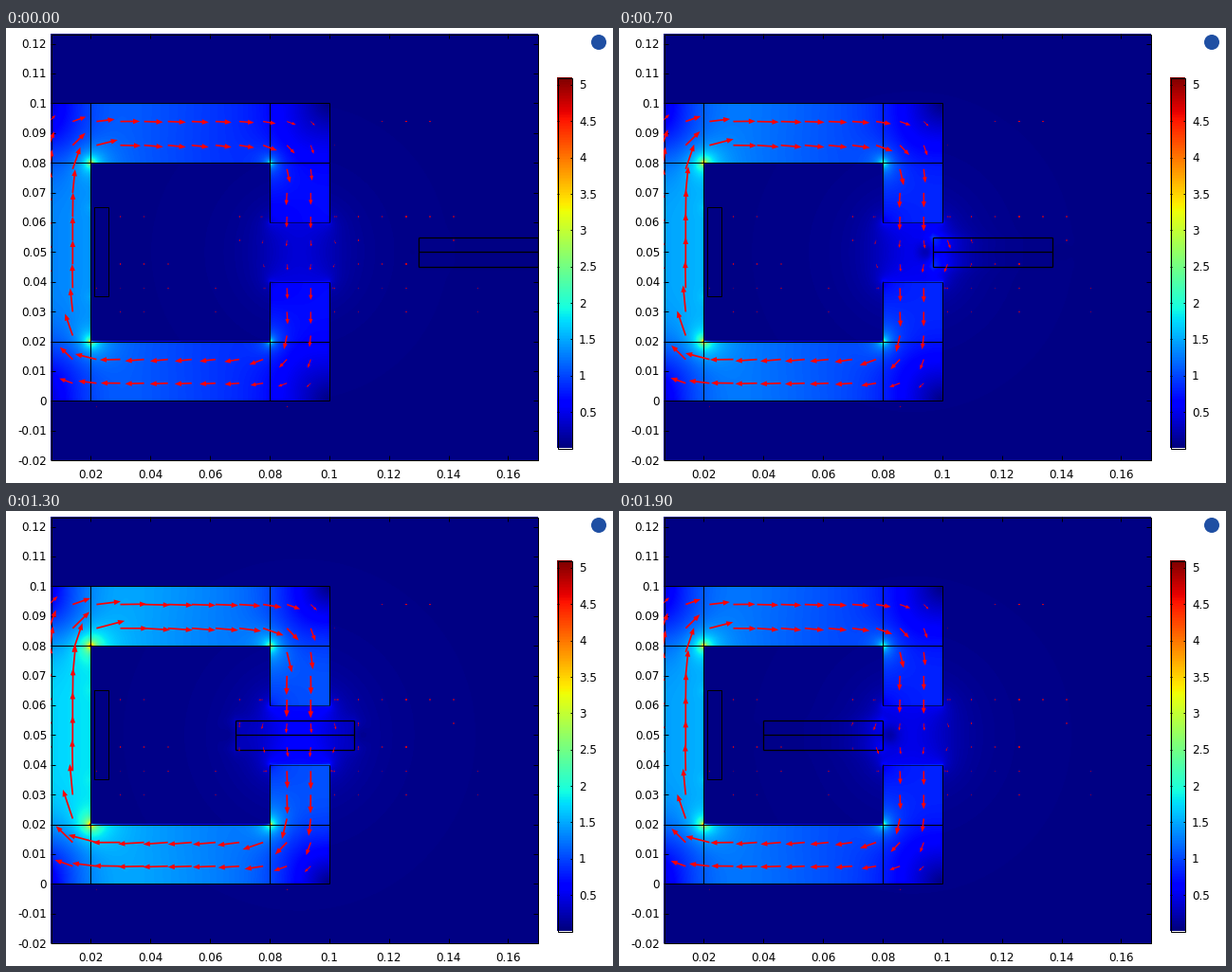
Recreate the animation shown at these times as a matplotlib script. Size 640x480 px, loop 2000 ms.

```python
import numpy as np
import matplotlib.pyplot as plt
from matplotlib.animation import FuncAnimation
from matplotlib.collections import LineCollection
from matplotlib.patches import Circle, Rectangle

W, H, DPI = 640, 480, 80
PT = 72 / DPI               # points per pixel
FRAMES, STEP = 20, 100
LEFT, TOP, PW, PH = 47, 6, 514, 450
VMAX = 5.1
ARROW = 18.8                # arrow pixels per tesla


def px(v):
    return 26.6 + 3143 * v


def py(v):
    return 393.3 - 3140 * v


# ---- flux in the upper half of the core, from a relaxed stream function ----
def solve_core(steps=2500):
    r, c = np.mgrid[0:127, 0:315].astype(float)
    width = np.minimum.reduce([c, r, 314 - c, np.full_like(c, 62)])
    depth = np.maximum(r, 63) - 63
    path = 94 + np.clip(c - 62, 0, 189) + np.where(c < 157, -depth, depth)
    leak = np.clip((path - 47) / 299, 0, 1)
    psi = np.stack([width, width * leak])
    iron = (r <= 63) | (c <= 62) | (c >= 251)
    free = (r < 63) | (c < 62) | (c > 251)
    free = free[1:-1, 1:-1]
    for _ in range(steps):
        mean = (psi[:, :-2, 1:-1] + psi[:, 2:, 1:-1]
                + psi[:, 1:-1, :-2] + psi[:, 1:-1, 2:]) / 4
        psi[:, 1:-1, 1:-1] = np.where(free, mean, psi[:, 1:-1, 1:-1])
        psi[:, -1] = psi[:, -2]
    d_row, d_col = np.gradient(psi, axis=(1, 2))
    return d_row[:, :, 20:], -d_col[:, :, 20:], iron[:, 20:]


def build_core():
    hx, hy, half = solve_core()
    bx, by = np.zeros((2, 2, PH, PW))
    mask = np.zeros((PH, PW), bool)
    up, down = slice(73, 200), slice(261, 388)
    bx[:, up, :295], by[:, up, :295], mask[up, :295] = hx, hy, half
    bx[:, down, :295] = -hx[:, ::-1]
    by[:, down, :295] = hy[:, ::-1]
    mask[down, :295] = half[::-1]
    by[:, 200:261, :43] = hy[:, -1:, :43]
    mask[200:261, :43] = True
    return bx, by, mask


def face(x, y, y0, a=278.0, b=341.0):
    """Field of a charged pole face from a to b at height y0."""
    dy = y - y0
    ex = 0.5 * np.log(((x - a) ** 2 + dy ** 2) / ((x - b) ** 2 + dy ** 2))
    ey = np.arctan((b - x) / dy) - np.arctan((a - x) / dy)
    return ex, ey


Y, X = np.mgrid[TOP:TOP + PH, LEFT:LEFT + PW] + 0.5
core_x, core_y, iron = build_core()
top_x, top_y = face(X, Y, 205.2)
bot_x, bot_y = face(X, Y, 267.2)
fade = np.exp(-np.hypot(X - 309, Y - 236) / 250) / 3.18
air_x, air_y = (top_x - bot_x) * fade, (top_y - bot_y) * fade
MID = py(0.05)


def bar_left(k):
    return 0.13 - 0.09 * k / (FRAMES - 1)


def field(k):
    e = np.interp(k, [0, 2, 5, 7, 9, 11, 15, 17, 19],
                  [0, 0.02, 0.18, 0.4, 0.75, 1, 1, 0.75, 0.35])
    limb, loss = 1.33 + 0.40 * e, 0.70 + 0.03 * e
    gap = 0.58 * (limb - loss)
    bx, by = air_x * gap, air_y * gap
    x0 = px(bar_left(k))
    x1 = px(bar_left(k) + 0.04)
    off_y = np.maximum(np.abs(Y - MID) - 15.7, 0)
    side = np.clip((MID - Y) / 8, -1, 1)
    for end, sign, gain in ((x0, 1, 0.6), (x1, -1, 0.36)):
        amp = gain * np.exp(-((end - 309.5) / 60) ** 2)
        inward = (X - end) * sign
        reach = np.maximum(inward, 0) / 20 + np.maximum(-inward, 0) / 6
        tip = amp * np.exp(-reach - off_y / 6)
        bx = bx + 0.37 * sign * side * tip
        by = by + 0.93 * tip
        spot = (X - end + 7 * sign) ** 2 + (Y - MID) ** 2
        dim = 1 - 0.6 * np.exp(-spot / 90)
        bx, by = bx * dim, by * dim
    bx = np.where(iron, limb * core_x[0] - loss * core_x[1], bx)
    by = np.where(iron, limb * core_y[0] - loss * core_y[1], by)
    return bx, by


# ---- stage ----
fig = plt.figure(figsize=(W / DPI, H / DPI), dpi=DPI, facecolor="white")
ax = fig.add_axes([0, 0, 1, 1])
ax.axis("off")


def segments(lines, width, **kw):
    art = LineCollection(lines, colors="black", linewidths=width * PT, **kw)
    ax.add_collection(art, autolim=False)
    return art


def box(x, y, w, h, **kw):
    return ax.add_patch(Rectangle((x, y), w, h, fill=False, ec="black",
                                  lw=PT, **kw))


def label(x, y, value, ha):
    ax.text(x, y + 4.5, f"{value:g}", ha=ha, va="baseline",
            family="DejaVu Sans", size=12 * PT, color="black")


image = ax.imshow(np.zeros((PH, PW)), cmap="jet", vmin=0, vmax=VMAX,
                  extent=(LEFT, LEFT + PW, TOP + PH, TOP),
                  interpolation="nearest", aspect="auto")
ax.imshow(np.linspace(VMAX, 0, 391)[:, None], cmap="jet", vmin=0, vmax=VMAX,
          extent=(581, 597, 443.5, 52.5), interpolation="nearest",
          aspect="auto")
ax.set_xlim(0, W)
ax.set_ylim(H, 0)
clip = Rectangle((LEFT, TOP), PW, PH, transform=ax.transData)

# core, coil and frame outlines
xa, xb, xc = px(0.02), px(0.08), px(0.1)
ya, yb, yc, yd, ye, yf = (py(v) for v in (0.1, 0.08, 0.06, 0.04, 0.02, 0))
outline = [[(LEFT, y), (xc, y)] for y in (ya, yb, ye, yf)]
outline += [[(x, s), (x, t)] for x in (xb, xc) for s, t in ((ya, yc), (yd, yf))]
outline += [[(xa, ya), (xa, yf)]]
segments(outline, 1)
segments([[(xb, y), (xc, y)] for y in (yc, yd)], 0.6)
box(px(0.021), py(0.065), px(0.026) - px(0.021), py(0.035) - py(0.065))
box(LEFT + 0.5, TOP + 0.5, PW - 1, PH - 1)
box(581.5, 52.5, 15, 391)

# ticks and labels
ticks = []
for i in range(1, 9):
    x = px(0.02 * i)
    ticks += [[(x, TOP), (x, TOP + 5)], [(x, TOP + PH - 5), (x, TOP + PH)]]
    label(x, 470.5, 0.02 * i, "center")
for i in range(-2, 13):
    y = py(0.01 * i)
    ticks += [[(LEFT, y), (LEFT + 5, y)],
              [(LEFT + PW - 5, y), (LEFT + PW, y)]]
    label(43, y, 0.01 * i, "right")
for i in range(1, 11):
    y = 443.5 - 76.7 * 0.5 * i
    ticks += [[(581, y), (583, y)], [(595, y), (597, y)]]
    label(604, y, 0.5 * i, "left")
segments(ticks, 1)

ax.add_patch(Circle((625, 15), 8, color="#1f4fa3", lw=0))

# moving bar
bar = segments([], 1.3, zorder=3)
bar.set_clip_path(clip)

# weak field marks: row -> columns of the arrow grid
GRID = 25.1
weak = {0: (13, 14, 15), 1: (11,), 4: (2, 3, 7, 11, 12, 13, 14, 15, 16),
        5: (7, 12, 16), 6: (2, 3, 4, 12, 13, 14),
        7: (1, 2, 3, 4, 6, 11, 12, 13, 14, 17),
        8: (2, 3, 6, 11, 12, 14, 17), 12: (1, 9)}
dots = np.array([(70.5 + GRID * i, 98.5 + GRID * j)
                 for j, cols in weak.items() for i in cols])
rng = np.random.default_rng(4)
tint = np.zeros((len(dots), 4))
tint[:, 0] = 1
tint[:, 3] = rng.uniform(0.25, 0.8, len(dots))
tint[1, 3] = 1
ax.scatter(dots[:, 0], dots[:, 1], s=(1.3 * PT) ** 2, c=tint, marker="s",
           linewidths=0, zorder=4)

# arrow grid
gx, gy = np.meshgrid(70.3 + GRID * np.arange(-1, 14),
                     98.6 + GRID * np.arange(12))
gx, gy = gx.ravel(), gy.ravel()
col = np.clip(gx - LEFT, 0, PW - 1).astype(int)
row = (gy - TOP).astype(int)
arrows = ax.quiver(gx, gy, np.ones_like(gx), np.ones_like(gx), color="red",
                   units="xy", angles="xy", scale_units="xy", scale=1,
                   width=1.7, headwidth=3.3, headlength=4.2,
                   headaxislength=4.2, minshaft=2.4, minlength=0.1, zorder=5)
arrows.set_clip_path(clip)


def update(k):
    bx, by = field(k)
    image.set_data(np.hypot(bx, by) + np.where(iron, 0, 0.03))

    u, v = ARROW * bx[row, col], ARROW * by[row, col]
    hide = np.hypot(u, v) < 2
    arrows.set_UVC(np.ma.array(u, mask=hide), np.ma.array(v, mask=hide))

    x0, x1 = px(bar_left(k)), px(bar_left(k) + 0.04)
    y0, y1 = py(0.055), py(0.045)
    bar.set_segments([[(x0, y), (x1, y)] for y in (y0, MID, y1)]
                     + [[(x, y0), (x, y1)] for x in (x0, x1)])
    return image, arrows, bar


anim = FuncAnimation(fig, update, frames=FRAMES, interval=STEP,
                     init_func=lambda: update(0), repeat=True,
                     repeat_delay=0, blit=False)
plt.show()
```
